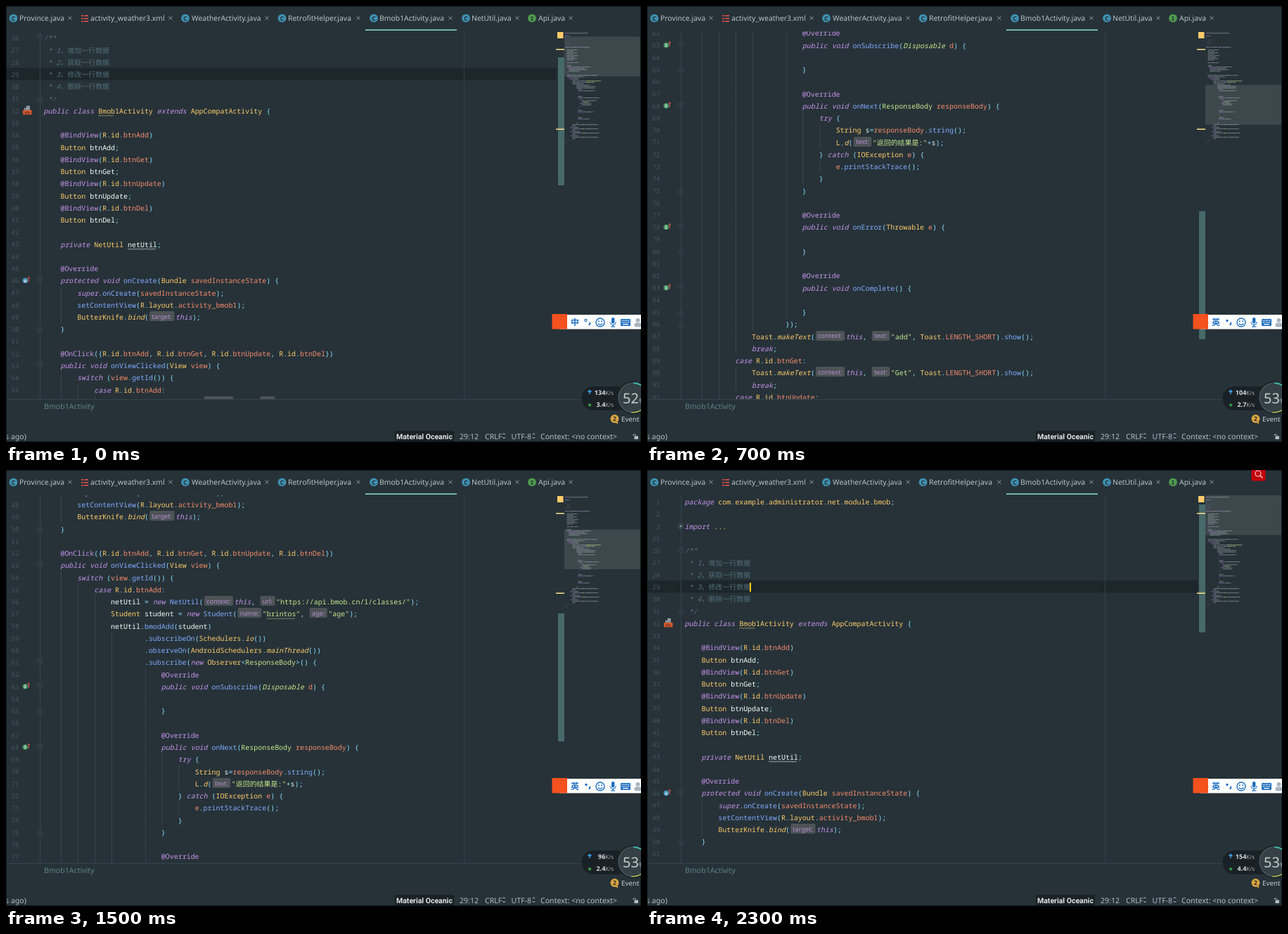
An HTML page with a canvas that plays this animation: 903x620 px, repeating every 2.4 s.

```html
<!DOCTYPE html>
<html lang="en">
<head>
<meta charset="utf-8">
<title>Code editor</title>
<style>
html, body { margin: 0; width: 100%; height: 100%; overflow: hidden; background: #263238; }
canvas { display: block; }
</style>
</head>
<body>
<canvas id="stage" width="903" height="620"></canvas>
<script>
const ctx = document.getElementById('stage').getContext('2d');
ctx.textRendering = 'geometricPrecision';

const LOOP = 2400, ROW = 17.25, TOP = 36.4, LEFT = 53.5, CHAR = 5.976, WIDE = 9.96;
const BG = '#263238', CARET_ROW = 7;
const MONO = '"Noto Sans Mono", "Noto Sans CJK SC", "Noto Sans CJK", monospace';
const SANS = '"Noto Sans", "Noto Sans CJK SC", sans-serif';
const HINT_FONT = `9.2px ${SANS}`;

const SOURCE = `package com.example.administrator.net.module.bmob;

import ...

/**
 * 1，增加一行数据
 * 2，获取一行数据
 * 3，修改一行数据
 * 4，删除一行数据
 */
public class Bmob1Activity extends AppCompatActivity {

    @BindView(R.id.btnAdd)
    Button btnAdd;
    @BindView(R.id.btnGet)
    Button btnGet;
    @BindView(R.id.btnUpdate)
    Button btnUpdate;
    @BindView(R.id.btnDel)
    Button btnDel;

    private NetUtil netUtil;

    @Override
    protected void onCreate(Bundle savedInstanceState) {
        super.onCreate(savedInstanceState);
        setContentView(R.layout.activity_bmob1);
        ButterKnife.bind(«target:»this);
    }

    @OnClick({R.id.btnAdd, R.id.btnGet, R.id.btnUpdate, R.id.btnDel})
    public void onViewClicked(View view) {
        switch (view.getId()) {
            case R.id.btnAdd:
                netUtil = new NetUtil(«context:»this, «url:»"https://api.bmob.cn/1/classes/");
                Student student = new Student(«name:»"brintos", «age:»"age");
                netUtil.bmodAdd(student)
                        .subscribeOn(Schedulers.io())
                        .observeOn(AndroidSchedulers.mainThread())
                        .subscribe(new Observer<ResponseBody>() {
                            @Override
                            public void onSubscribe(Disposable d) {

                            }

                            @Override
                            public void onNext(ResponseBody responseBody) {
                                try {
                                    String s=responseBody.string();
                                    L.d(«text:»"返回的结果是:"+s);
                                } catch (IOException e) {
                                    e.printStackTrace();
                                }
                            }

                            @Override
                            public void onError(Throwable e) {

                            }

                            @Override
                            public void onComplete() {

                            }
                        });
                Toast.makeText(«context:»this, «text:»"add", Toast.LENGTH_SHORT).show();
                break;
            case R.id.btnGet:
                Toast.makeText(«context:»this, «text:»"Get", Toast.LENGTH_SHORT).show();
                break;
            case R.id.btnUpdate:
                Toast.makeText(«context:»this, «text:»"update", Toast.LENGTH_SHORT).show();
                break;
            case R.id.btnDel:
                Toast.makeText(«context:»this, «text:»"del", Toast.LENGTH_SHORT).show();
                break;
        }
    }
}
`;

// kind: [colour, italic]
const STYLE = {
  key: ['#c792ea', true], ann: ['#c792ea'], stat: ['#ffcb6b', true], iface: ['#c3e88d', true],
  abs: ['#c3e88d'], param: ['#f78c6c'], type: ['#ffcb6b'], fn: ['#82aaff'], str: ['#c3e88d'],
  word: ['#eeffff'], op: ['#89ddff'], note: ['#546e7a', true], cjk: ['#546e7a'], hint: ['#b48fd2']
};
const CODE = new RegExp([
  '(?<hint>«.+?»)', '(?<str>"[^"]*")', '(?<ann>@\\w+)',
  '(?<key>\\b(?:package|import|public|private|protected|class|extends|void|super|this|switch|case|new|try|catch|break)\\b)',
  '(?<stat>\\b(?:makeText|bind|io|mainThread|d)(?=\\())', '(?<iface>Disposable)', '(?<abs>ResponseBody)',
  '(?<param>LENGTH_SHORT|activity_bmob1|\\b(?:savedInstanceState|responseBody|view|[ed])\\b|(?<=\\.)btn\\w+)',
  '(?<fn>(?:(?<=new )[A-Z]|\\b[a-z])\\w*(?=\\())',
  '(?<type>[A-Z]\\w*|\\b(?:id|layout|com|example|administrator|net|module|bmob)\\b|\\.{3})',
  '(?<word>\\w+)', '(?<op>[^\\w\\s«"@]+)'
].join('|'), 'g');
const COMMENT = /(?<cjk>[\u3000-\uffff]+)|(?<note>[^\s\u3000-\uffff]+)/g;

const textWidth = s => [...s].reduce((w, c) => w + (c > '\u2fff' ? WIDE : CHAR), 0);
const indentOf = s => s.search(/\S/);

function layout(line) {
  let x = LEFT, end = 0, hidden = 0;
  return [...line.matchAll(/^ ?[/*]/.test(line) ? COMMENT : CODE)].map(m => {
    const kind = Object.keys(m.groups).find(k => m.groups[k]);
    x += (m.index - end) * CHAR;
    end = m.index + m[0].length;
    const token = { kind, x, col: m.index - hidden, text: m[0] };
    if (kind === 'hint') {
      token.text = m[0].slice(1, -1);
      ctx.font = HINT_FONT;
      token.w = ctx.measureText(token.text).width;
      x += token.w + 9.3;
      hidden += m[0].length;
    } else x += textWidth(m[0]);
    return token;
  });
}

const lines = SOURCE.split('\n');
const stack = [];
const rows = lines.map((line, i) => {
  const depth = indentOf(lines.slice(i).find(l => l.trim()) || '}');
  while (stack.length && stack[stack.length - 1] >= depth) stack.pop();
  const guides = stack.filter(c => c > 0);
  if (line.trim()) stack.push(depth);
  return { num: i < 3 ? i + 1 : i + 22, tokens: layout(line), guides };
});

function rect(x, y, w, h, color) { ctx.fillStyle = color; ctx.fillRect(x, y, w, h); }
function disc(x, y, r, color) {
  ctx.fillStyle = color;
  ctx.beginPath(); ctx.arc(x, y, r, 0, 7); ctx.fill();
}
function arc(x, y, r, a, b, color, width) {
  ctx.strokeStyle = color; ctx.lineWidth = width;
  ctx.beginPath(); ctx.arc(x, y, r, a, b); ctx.stroke();
}
function path(points, color, width = 1, close = false) {
  ctx.strokeStyle = color; ctx.lineWidth = width;
  ctx.beginPath();
  points.forEach(([x, y]) => ctx.lineTo(x, y));
  if (close) ctx.closePath();
  ctx.stroke();
}
function round(x, y, w, h, r, color) {
  ctx.fillStyle = color;
  ctx.beginPath(); ctx.roundRect(x, y, w, h, r); ctx.fill();
}
function text(s, x, y, color, font, align = 'left') {
  ctx.font = font; ctx.fillStyle = color; ctx.textAlign = align;
  ctx.fillText(s, x, y);
}
const ui = (s, x, y, color = '#b0bec5', size = 10.6) => text(s, x, y, color, `${size}px ${SANS}`);
function wave(x, y, w, color) {
  const pts = [];
  for (let i = 0; i <= w; i += 2) pts.push([x + i, y + (i % 4 ? 1 : -0.5)]);
  path(pts, color, 0.8);
}

const FOLD_START = [26, 46, 53, 61, 63, 68, 78, 83], FOLD_END = [31, 50, 65, 75, 80, 85, 86, 99];
const UNDERLINE = { 32: [13, 4, '#b3a568'], 43: [20, 7, '#c4d0d0'] };

function fold(y, dir) {
  const color = '#37474f';
  path([[44.5, y - 4 * dir], [51.5, y - 4 * dir], [51.5, y + dir], [48, y + 4 * dir], [44.5, y + dir]], color, 1, true);
  path([[46.5, y - dir], [49.5, y - dir]], color);
}
function overrideIcon(y, color, letter) {
  disc(27.3, y, 3.7, color);
  text(letter, 27.3, y + 2.3, '#dfe9eb', `bold 6.2px ${SANS}`, 'center');
  path([[32.2, y + 2], [32.2, y - 5]], '#d9574d', 1.1);
  path([[30.6, y - 3], [32.2, y - 5], [33.8, y - 3]], '#d9574d');
}
function gutter(num, y) {
  const mid = y + 9;
  text(num, 18.6, y + 12.8, '#425660', `9.2px ${MONO}`, 'right');
  if (FOLD_START.includes(num)) fold(mid, 1);
  if (FOLD_END.includes(num)) fold(mid, -1);
  if (num === 3) {
    rect(45, mid - 3, 6, 6, BG);
    ctx.strokeStyle = '#46575f'; ctx.lineWidth = 1;
    ctx.strokeRect(45, mid - 3, 6, 6);
    rect(46.5, mid - 0.5, 3, 1, '#a9b7bd'); rect(47.5, mid - 1.5, 1, 3, '#a9b7bd');
  }
  if (num === 32) {
    rect(29, mid - 7, 5, 6, '#8d9aa0'); rect(26, mid - 4, 4, 3, '#8d9aa0');
    rect(24, mid - 1, 12.5, 6.5, '#d3572f');
    text('<>', 30.2, mid + 4.6, '#40211a', `bold 6.5px ${SANS}`, 'center');
  }
  if (num === 46) overrideIcon(mid, '#4a9cc0', 'o');
  if ([63, 68, 78, 83].includes(num)) overrideIcon(mid, '#4d9e6a', 'I');
}

function drawRow(row, y) {
  for (const c of row.guides) rect(Math.round(LEFT + c * CHAR + 0.6), y, 1, ROW, '#35454d');
  gutter(row.num, y);
  for (const t of row.tokens) {
    const [color, italic] = STYLE[t.kind];
    if (t.kind === 'hint') {
      round(t.x + 1.2, Math.round(y + 1), t.w + 6.6, 14, 2, '#4d5356');
      text(t.text, t.x + 4.4, y + 11.7, color, HINT_FONT);
    } else text(t.text, t.x, y + 13, color, `${italic ? 'italic ' : ''}${WIDE}px ${MONO}`);
    if (t.text === '"brintos"') wave(t.x + CHAR, y + 15.7, 7 * CHAR, '#7fae6a');
  }
  const mark = UNDERLINE[row.num];
  if (mark) wave(LEFT + mark[0] * CHAR, y + 15.7, mark[1] * CHAR, mark[2]);
}

function drawMinimap(scroll) {
  rect(794, 36 + scroll * 0.1093, 108, 56.5, '#3d484d');
  rows.forEach((row, i) => row.tokens.forEach(t => {
    if (t.kind === 'hint') return;
    ctx.globalAlpha = /note|cjk/.test(t.kind) ? 0.25 : 0.5;
    const color = /key|str|note|cjk/.test(t.kind) ? STYLE[t.kind][0] : '#a3b0b6';
    rect(795 + t.col * 0.66, 38 + i * 2, t.text.length * 0.66, 1.2, color);
  }));
}

function drawCode(scroll, caret) {
  ctx.save();
  ctx.beginPath(); ctx.rect(1, 36, 901, 523); ctx.clip();
  const caretY = TOP + CARET_ROW * ROW - scroll;
  rect(1, caretY, 782, ROW, '#1c262b');
  rect(48, 36, 1, 523, '#33434b');
  rect(651, 36, 1, 523, '#314148');
  rows.forEach((row, i) => {
    const y = TOP + i * ROW - scroll;
    if (y > 15 && y < 560) drawRow(row, y);
  });
  if (caret) rect(146, caretY + 3, 2, 13, '#ffcc00');

  rect(785, 49 + scroll * 0.3483, 9, 182, '#47696a');
  rect(784, 37, 8.5, 9, '#ffcb6b');
  rect(782, 61, 12, 1.5, '#ffdf8a');
  rect(782, 174.5, 12, 1.5, '#ffdf8a');
  drawMinimap(scroll);
  ctx.restore();
}

// icon x, label, label x, close x
const TABS = [
  [10.5, 'Province.java', 19, 91], [112, 'activity_weather3.xml', 120, 234],
  [255, 'WeatherActivity.java', 264, 371], [392.5, 'RetrofitHelper.java', 401, 501],
  [523, 'Bmob1Activity.java', 531, 632], [654, 'NetUtil.java', 662, 727], [748, 'Api.java', 757, 803]
];

function drawTabs() {
  for (const [ix, label, x, close] of TABS) {
    if (label.endsWith('xml')) {
      for (const dy of [-4, 0, 4]) {
        rect(ix - 5, 17 + dy, 3, 1.6, '#e0524d');
        rect(ix - 1, 17 + dy, 6, 1.6, '#e0524d');
      }
    } else {
      const api = label === 'Api.java';
      disc(ix, 17.3, 5.9, api ? '#4f9a4c' : '#3f8fb0');
      text(api ? 'I' : 'C', ix, 20.5, '#1f2c32', `bold 8.5px ${SANS}`, 'center');
    }
    ui(label, x, 21, '#b6c3c9', 10.4);
    path([[close - 2.5, 14.7], [close + 2.5, 19.7]], '#8b999f');
    path([[close + 2.5, 14.7], [close - 2.5, 19.7]], '#8b999f');
  }
  rect(511, 33.3, 130, 1.7, '#80cbc4');
}

function updown(x) {
  path([[x - 1.7, 609.5], [x, 607.5], [x + 1.7, 609.5]], '#b0bec5');
  path([[x - 1.7, 613], [x, 615], [x + 1.7, 613]], '#b0bec5');
}
function drawStatus() {
  rect(1, 559, 901, 1, '#34434a');
  ui('Bmob1Activity', 54, 572.5, '#62808c');
  ui('s ago)', -1, 616);
  rect(553, 604, 84, 15, '#1a2226');
  text('Material Oceanic', 555, 616, '#dfe7ea', '700 10.5px Roboto, sans-serif');
  ui('29:12', 645, 616);
  ui('CRLF', 681, 616); updown(708);
  ui('UTF-8', 718.5, 616); updown(750.5);
  ui('Context: <no context>', 760, 616);
  rect(893.5, 611.5, 5.5, 4.5, '#b0bec5');
  arc(893.7, 611, 2, Math.PI, 0, '#b0bec5', 1);
  disc(865.5, 587, 6, '#d9a343');
  path([[867, 591], [870, 593.5]], '#d9a343', 2);
  text('2', 865.5, 590.2, '#2b2b22', `bold 8.5px ${SANS}`, 'center');
  ui('Event Log', 875, 591, '#c3ced3', 9.8);
}

function drawInput(mode) {
  const blue = '#1f6fc0';
  rect(787, 439, 116, 20.5, '#ffffff');
  rect(776.5, 438, 21.5, 21.5, '#f4511e');
  text(mode, 803, 454.3, blue, 'bold 12px "Noto Sans CJK SC", "Noto Sans CJK", sans-serif');
  if (mode === '中') arc(824.5, 447, 1.6, 0, 7, blue, 1.1);
  else disc(825, 447.5, 1.7, blue);
  path([[830, 450], [830.5, 451.5], [829, 454]], blue, 2);
  arc(845, 450, 6, 0, 7, blue, 1.4);
  disc(842.8, 448.3, 1, blue); disc(847.2, 448.3, 1, blue);
  arc(845, 450.4, 3, 0.3, 2.84, blue, 1.2);
  round(861, 443, 4.4, 8.5, 2.2, blue);
  arc(863.2, 449.3, 4, 0, Math.PI, blue, 1.2);
  rect(862.6, 453, 1.3, 3, blue); rect(860, 455.5, 6.4, 1.2, blue);
  round(874, 445, 14, 10, 1.2, blue);
  for (let i = 0; i < 10; i++) rect(875.6 + i % 5 * 2.3, 446.6 + (i > 4) * 2.6, 1.3, 1.3, '#fff');
  rect(877, 452, 8, 1.3, '#fff');
  disc(898.5, 447, 3, '#a9b4c0');
  round(893.5, 450.5, 10, 6, 3, '#a9b4c0');
}

function drawMeter(up, down, load) {
  round(818.5, 541, 70, 34, 17, '#1a2126');
  path([[830, 552], [830, 547]], '#3fa9f5', 1.4);
  path([[827.5, 549], [830, 546.4], [832.5, 549]], '#3fa9f5', 1.4);
  text('★', 830, 569.8, '#35b34a', '8px "DejaVu Sans", sans-serif', 'center');
  const speed = (v, y) => {
    text(v, 852.3, y, '#d3dadd', `bold 9px ${SANS}`, 'right');
    text('K/s', 852.3, y, '#a3adb2', `8px ${SANS}`);
  };
  speed(up, 552.8);
  speed(down, 570.3);
  disc(892, 557, 23.5, '#1b2328');
  disc(892, 557, 21.5, '#354046');
  arc(892, 557, 20.8, 0, 7, '#4c585d', 1.2);
  arc(892, 557, 21, -1.55, -0.9, '#3fb8ac', 1.8);
  arc(892, 557, 21, 0.9, 1.7, '#a9b84c', 1.5);
  text(load, 877, 564.5, '#c3ccd0', `20px ${SANS}`);
  text('%', 900, 564.5, '#c3ccd0', `9px ${SANS}`);
}

function drawSearch() {
  round(859.5, -4, 20, 19.5, 2, '#c4000c');
  arc(869, 5, 4, 0, 7, '#f6dada', 1.1);
  path([[872, 8], [875.5, 11.5]], '#f6dada', 1.2);
}

// scroll offset per 100 ms tick
const DOWN = [219, 402, 562, 697, 804, 884.5, 927, 942, 942], UP = [933, 735, 444.8, 192, 22, 0];
function scrollAt(t) {
  const tick = Math.floor(t / 100);
  if (tick < 4) return 69;
  return tick < 13 ? DOWN[tick - 4] : UP[Math.min(tick - 13, 5)];
}
function speeds(t) {
  if (t < 200) return ['134', '3.4'];
  if (t < 1100) return ['104', '2.7'];
  return t < 2000 ? ['96', '2.4'] : ['154', '4.4'];
}

function draw(t) {
  rect(0, 0, 903, 620, BG);
  drawCode(scrollAt(t), t >= 1300 && t < 1800 || t >= 2300);
  drawTabs();
  drawStatus();
  ctx.strokeStyle = '#11181b'; ctx.lineWidth = 1;
  ctx.strokeRect(0.5, 0.5, 902, 619);
  drawInput(t < 400 ? '中' : '英');
  drawMeter(...speeds(t), t < 700 ? '52' : '53');
  if (t >= 2000) drawSearch();
}

const start = performance.now();
function frame() {
  draw((performance.now() - start) % LOOP);
  requestAnimationFrame(frame);
}
frame();
</script>
</body>
</html>
```
